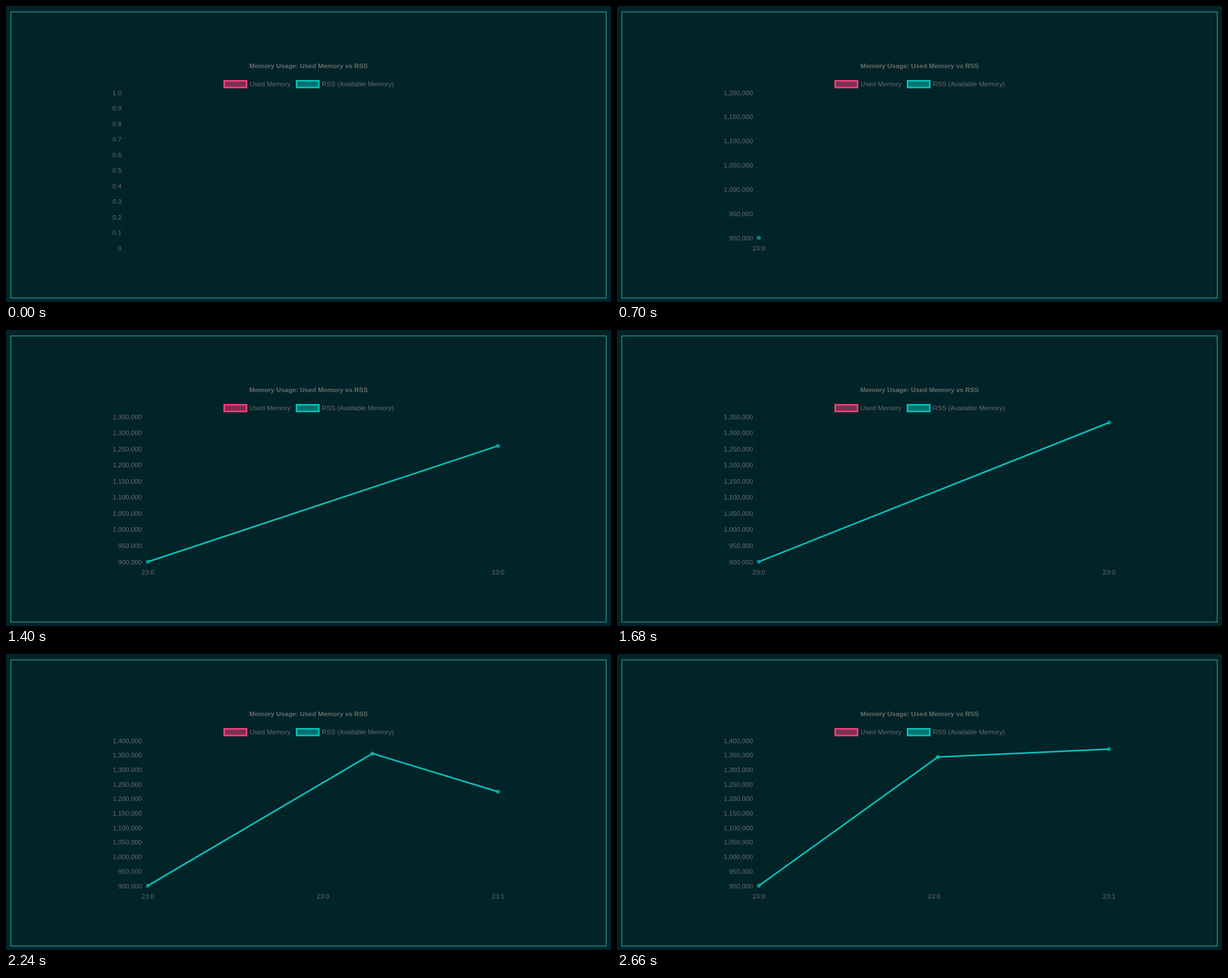
Recreate the animation shown at these times as an HTML page with a canvas. Size 1069 by 524 pixels, loop 3470 ms.

```html
<!DOCTYPE html>
<html lang="en">
<head>
<meta charset="utf-8">
<title>Memory Usage</title>
<style>
  html, body { margin: 0; width: 100%; height: 100%; overflow: hidden; background: #002428; }
  canvas { display: block; }
</style>
</head>
<body>
<canvas id="stage" width="1069" height="524"></canvas>
<script>
const ctx = document.getElementById('stage').getContext('2d');
const LOOP = 3470, TICK = 140;
const TOP = 153.5, BASE = 410.5, LEFT = 250.5, MID = 560, RIGHT = 869.5;
const PINK = '244, 62, 125', TEAL = '8, 193, 184';
const GREY = '#6b6b6b', GRID = 'rgba(0, 0, 0, 0.1)';

const easeOutQuart = t => 1 - (1 - t) ** 4;
const mix = (a, b, p) => a + (b - a) * p;

function text(str, x, y, align = 'left', weight = 'normal') {
  ctx.font = `${weight} 11.65px "Liberation Sans", Arial, sans-serif`;
  ctx.textAlign = align;
  ctx.fillStyle = GREY;
  ctx.fillText(str, x, y);
}

function stroke(points, color, width) {
  ctx.beginPath();
  points.forEach(([x, y]) => ctx.lineTo(x, y));
  ctx.strokeStyle = color;
  ctx.lineWidth = width;
  ctx.stroke();
}

function legend(x, label, rgb) {
  ctx.fillStyle = `rgba(${rgb}, 0.5)`;
  ctx.fillRect(x, 132.4, 39.4, 11.8);
  ctx.strokeStyle = `rgb(${rgb})`;
  ctx.lineWidth = 2.8;
  ctx.strokeRect(x, 132.4, 39.4, 11.8);
  text(label, x + 44.7, 142);
}

function yAxis(labels, left, bottom) {
  const gap = (bottom - TOP) / (labels.length - 1);
  labels.forEach((label, i) => {
    const y = bottom - i * gap, line = Math.floor(y) + 0.5;
    stroke([[left - 10, line], [bottom === BASE && labels.length > 7 ? RIGHT : 880, line]], GRID, 1);
    text(label, left - 10.3, y + 4, 'right');
  });
}

function xAxis(ticks) {
  ticks.forEach(([x, label]) => {
    stroke([[x, TOP], [x, BASE + 10]], GRID, 1);
    text(label, x, 433, 'center');
  });
}

function thousands(max) {
  const labels = [];
  for (let v = 900000; v <= max; v += 50000) labels.push(v.toLocaleString('en-US'));
  return labels;
}

function series(points) {
  if (points.length > 1) stroke(points, `rgb(${TEAL})`, 2.8);
  for (const [x, y] of points) {
    ctx.beginPath();
    ctx.arc(x, y, 2.9, 0, Math.PI * 2);
    ctx.fillStyle = `rgba(${TEAL}, 0.5)`;
    ctx.fill();
    ctx.strokeStyle = `rgb(${TEAL})`;
    ctx.lineWidth = 1;
    ctx.stroke();
  }
}

// Chart contents for a time already snapped to the redraw tick.
function chart(t) {
  if (t < 420) {
    yAxis(['0', ...Array.from({ length: 10 }, (_, i) => ((i + 1) / 10).toFixed(1))], 214.5, 428.5);
    stroke([[214.5, TOP], [214.5, 428.5]], GRID, 1);
    return;
  }
  const first = [LEFT, 410.3];
  const ticks = [[LEFT, '23:0']];
  let max = 1200000, points = [first];

  if (t >= 2100) {
    ticks.push([MID, '23:0'], [RIGHT, '23:1']);
    if (t < 2240) {
      const p = easeOutQuart(0.038);
      max = 1350000;
      points.push([mix(RIGHT, MID, p), mix(164, 158, p)]);
    } else {
      const n = Math.min(3, (t - 2240) / TICK);
      const p = easeOutQuart(0.242 + 0.1185 * n);
      max = 1400000;
      points.push([mix(825, MID, p), mix(163, 182.8, p)], [RIGHT, mix(BASE, 161.8, p)]);
    }
  } else if (t >= 1120) {
    const n = Math.min(4, (t - 1120) / TICK);
    ticks.push([RIGHT, '23:0']);
    max = 1350000;
    points.push([RIGHT, mix(BASE, 158, easeOutQuart(0.077 + 0.133 * n))]);
  }
  yAxis(thousands(max), LEFT, BASE);
  xAxis(ticks);
  series(points);
}

function draw() {
  const t = performance.now() % LOOP;
  ctx.fillStyle = '#002428';
  ctx.fillRect(0, 0, 1069, 524);
  ctx.strokeStyle = '#30a89d';
  ctx.lineWidth = 1.2;
  ctx.strokeRect(8.5, 10.5, 1052, 506.5);
  text('Memory Usage: Used Memory vs RSS', 534.5, 109.6, 'center', 'bold');
  legend(385.6, 'Used Memory', PINK);
  legend(513.4, 'RSS (Available Memory)', TEAL);
  chart(Math.floor(t / TICK) * TICK);
  requestAnimationFrame(draw);
}
draw();
</script>
</body>
</html>
```
